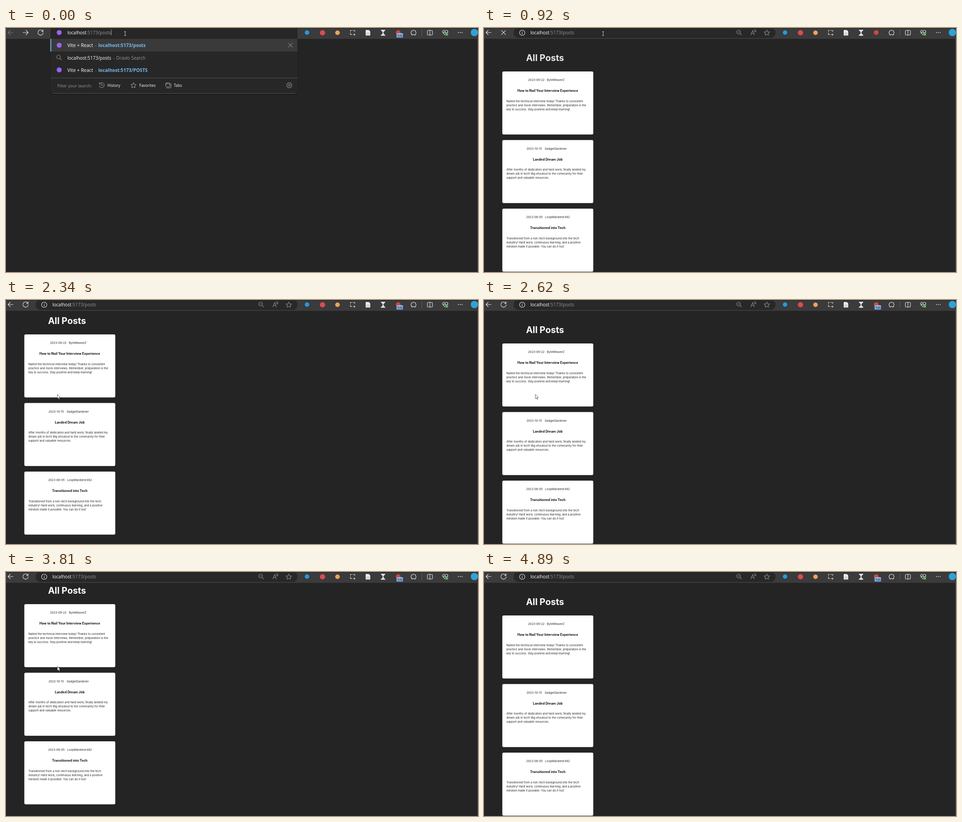
Animation, 1038 px wide and 539 px high, one loop 5.94 s. Source, as an HTML page:

```html
<!DOCTYPE html>
<html lang="en">
<head>
<meta charset="utf-8">
<title>All Posts</title>
<style>
  html, body { margin: 0; width: 100%; height: 100%; overflow: hidden; background: #242424; }
  svg { display: block; width: 1038px; height: 539px; }
  text { font-family: "Open Sans", "Noto Sans", sans-serif; font-size: 10px; fill: #fff; white-space: pre; }
  .line { fill: none; stroke: #e4e4e4; stroke-width: 1.1; stroke-linecap: round; stroke-linejoin: round; }
  .soft { stroke: #8d8d8d; }
  .dim { stroke: #777; }
  .thin { stroke: #b5b5b5; stroke-width: .9; }
  .grey { fill: #979797; }
  .name { font-size: 10.4px; }
  .url { font-weight: 700; font-size: 10.2px; fill: #76b9ed; }
  .label { font-size: 9.1px; }
  .chip { font-size: 8.5px; }
  .badge { font-size: 8px; font-weight: 600; fill: #14233c; }
  #page text { font-family: Inter, sans-serif; font-size: 6.2px; fill: #242424; font-optical-sizing: none; }
  #page .title { font-size: 19.6px; font-weight: 700; fill: #fff; }
  #page .head { font-size: 7.2px; font-weight: 700; fill: #111; }
</style>
</head>
<body>
<svg viewBox="0 0 1038 539" xmlns="http://www.w3.org/2000/svg">
  <defs>
    <g id="reload" class="line"><path d="M5.2-2.6A5.8 5.8 0 1 0 5.8.4M5.6-6V-2.4H2"/></g>
    <g id="stop" class="line"><path d="M-4.6-4.6L4.6 4.6M4.6-4.6L-4.6 4.6"/></g>
    <g id="info" class="line"><circle r="5.8"/><path d="M0-.6V3M0-2.9V-2.7"/></g>
    <g id="tools" class="line soft">
      <circle cx="560" cy="9" r="4.3"/><path d="M563.2 12.2L566.6 15.6M558 9H562"/>
      <path d="M587 15L590.8 5.2L594.6 15M588.2 12H593.3M594.3 4.8Q596 6.5 595.7 8.6M596.2 3.6Q598.4 6 597.8 9.2"/>
      <path data-star="6.4" transform="translate(622 10.8)"/>
    </g>
  </defs>
  <rect width="1038" height="539" fill="#242424"/>
  <g id="page" data-in="posts done"></g>

  <rect width="1038" height="24" fill="#3b3b3b"/>
  <path class="line dim" data-in="menu load" d="M15.6 10H4.4M9.4 5L4.4 10L9.4 15"/>
  <path class="line" data-in="blank posts done" d="M15.6 10H4.4M9.4 5L4.4 10L9.4 15"/>
  <path class="line" data-in="menu load" d="M37.2 10H48.8M43.8 5L48.8 10L43.8 15"/>
  <use href="#reload" x="76" y="10" data-in="menu"/>
  <use href="#stop" x="76" y="10" data-in="load"/>
  <use href="#stop" x="43" y="10" data-in="blank posts"/>
  <use href="#reload" x="43" y="10" data-in="done"/>

  <g data-in="load">
    <rect x="98" y="-1" width="543" height="23" rx="11.5" fill="#282828"/>
    <use href="#info" x="117" y="10.5"/><use href="#tools"/>
    <text x="135" y="14">localhost<tspan class="grey">:5173/posts</tspan></text>
  </g>
  <g data-in="blank posts done">
    <rect x="65" y="-1" width="576" height="23" rx="11.5" fill="#282828"/>
    <use href="#info" x="84" y="10.5"/><use href="#tools"/>
    <text x="102" y="14">localhost<tspan class="grey">:5173/posts</tspan></text>
  </g>

  <g data-in="menu">
    <rect x="97" y="20" width="545" height="128" rx="6" fill="#1e1e1e"/>
    <path d="M98 0H641V139Q641 145 635 145H104Q98 145 98 139Z" fill="#272727"/>
    <rect x="98" y="24" width="543" height="28" fill="#3a3a3a"/>
    <rect x="97.5" y="24" width="2" height="28" fill="#76b9ed"/>
    <path d="M98 110.5H641M102 144.5H637" stroke="#515151"/>
    <g fill="#9a62ee"><circle cx="117" cy="10" r="5.5"/><circle cx="117" cy="38" r="5.5"/><circle cx="117" cy="92.5" r="5.5"/></g>
    <text x="135" y="14">localhost<tspan class="grey">:5173/posts</tspan></text>
    <path d="M231.5 3V16" stroke="#b0b0b0" stroke-width=".8"/>
    <text x="135" y="42" class="name">Vite + React</text>
    <text x="196" y="42" class="grey">-</text>
    <text x="203" y="42" class="url">localhost:5173/posts</text>
    <path class="line thin" d="M621 33.5L630 42.5M630 33.5L621 42.5"/>
    <g class="line soft"><circle cx="115.5" cy="64" r="4"/><path d="M118.5 67L122 70.5"/></g>
    <text x="135" y="70">localhost:5173/posts</text>
    <text x="236" y="70" class="grey">-</text>
    <text x="242.5" y="70" class="grey">Dravlo Search</text>
    <text x="135" y="97" class="name">Vite + React</text>
    <text x="196" y="97" class="grey">-</text>
    <text x="203" y="97" class="url">localhost:5173/POSTS</text>
    <text x="113" y="130.5" class="grey label">Filter your search:</text>
    <text x="223" y="129.5" class="chip">History</text>
    <text x="293" y="129.5" class="chip">Favorites</text>
    <text x="369" y="129.5" class="chip">Tabs</text>
    <g class="line thin">
      <path d="M205.8 123.2A5.6 5.6 0 1 1 205 127.5M205.3 120.8V123.6H208.2M210.4 123.4V127H213"/>
      <path data-star="6.2" transform="translate(280.3 127)"/>
      <rect x="351.2" y="121" width="9.4" height="9" rx="2"/>
      <path d="M351.2 123.6H360.6M353.4 132.4H360.4Q363 132.4 363 129.8V123.4"/>
      <path id="gear" transform="translate(623 126.5)"/><circle cx="623" cy="126.5" r="1.9"/>
    </g>
  </g>

  <circle cx="662" cy="10" r="4.8" fill="#219be3"/>
  <circle cx="696" cy="10.5" r="5.8" fill="#dc4b55"/>
  <circle cx="729" cy="10.5" r="5" fill="#eda45c"/>
  <path class="line" d="M757.5 7.5V5.5H760M763 5.5H767V8M757.5 10.5V14.5H761M764 14.5H768M766 12.5V16.5"/>
  <path d="M791 4.5H798L801 7.5V16.5H791Z" fill="#eee"/>
  <path d="M792.5 11H799.5M792.5 13.5H799.5" stroke="#aaa"/>
  <path d="M825 5H833.5L829.8 10.5L833.5 16H825L828.7 10.5Z" fill="#c4deef"/>
  <path d="M824.5 4.8H834M824.5 16.2H834" stroke="#f2f2f2" stroke-width="1.4"/>
  <circle cx="862.5" cy="10" r="5.3" fill="#cf463f"/>
  <g data-in="menu load done">
    <rect x="859" y="11.5" width="14" height="9.5" rx="1.5" fill="#8fbcf5"/>
    <text x="866" y="19.6" text-anchor="middle" class="badge">1m</text>
  </g>
  <path class="line" d="M892 6H894.5A2 2 0 0 1 898.4 6H900.6V8.6A2 2 0 0 1 900.6 12.4V15.4H897.8A1.9 1.9 0 0 0 894.2 15.4H892V12.6A2.2 2.2 0 0 1 892 8.4Z"/>
  <path d="M914.5 4V17" stroke="#626262"/>
  <path class="line" d="M931 5.5H928Q926.6 5.5 926.6 7V14Q926.6 15.3 928 15.3H931M933.5 5.5H936.4Q937.8 5.5 937.8 7V14Q937.8 15.3 936.4 15.3H933.5M932.2 4V17"/>
  <path class="line" d="M966 15.6L961.4 11Q959.2 8 961.2 5.8Q963.8 3.8 966 6.6Q968.4 3.8 970.8 5.8Q972.6 8 971 10.4M960.5 10H963.5L965 7.8L967 12L968.2 10H970"/>
  <circle cx="969.5" cy="14" r="2.9" fill="#58b368"/>
  <g fill="#e4e4e4"><circle cx="995" cy="10" r="1"/><circle cx="999" cy="10" r="1"/><circle cx="1003" cy="10" r="1"/></g>
  <circle cx="1030" cy="10" r="8" fill="#2ba3dc"/>
  <path d="M0 .5H1038" stroke="#262626"/>
  <path d="M1037.5 24V539" stroke="#555"/>

  <path id="beam" d="M260 8H264M260 16.5H264M262 8V16.5" stroke="#c8c8c8"/>
  <path id="arrow" d="M0 0V9.4L2.2 7.5L3.8 11L5.3 10.3L3.8 7H6.6Z" fill="#fff" stroke="#222" stroke-width=".7"/>
</svg>
<script>
const LOOP = 5940;
const $ = id => document.getElementById(id);

// Each track holds [start time, value] and keeps the value until the next entry.
const views = [[0, 'menu'], [530, 'load'], [790, 'blank'], [920, 'posts'], [1050, 'done']];
const scroll = [
  [0, 0], [1910, -44.5], [2060, -56], [2340, -20], [2490, -5], [2620, 0],
  [2900, 17], [3160, 11.5], [3310, 3], [3430, 0],
  [3810, -25], [3940, -45], [4070, -56], [4220, -16], [4350, 0]
];
const pointer = [
  [0, null], [1480, [133.5, 200]], [1630, [113, 208.5]],
  [4350, [653, 314]], [4500, [728, 412]], [4760, [834.5, 412]], [4890, null]
];
const at = (track, t) => track.findLast(step => step[0] <= t)[1];

const ring = (n, radius) => 'M' + Array.from({ length: n }, (_, i) => {
  const a = i * 2 * Math.PI / n - Math.PI / 2, r = radius(i);
  return (r * Math.cos(a)).toFixed(2) + ' ' + (r * Math.sin(a)).toFixed(2);
}).join('L') + 'Z';

document.querySelectorAll('[data-star]').forEach(el => {
  const r = +el.dataset.star;
  el.setAttribute('d', ring(10, i => i % 2 ? r * 0.48 : r));
});
$('gear').setAttribute('d', ring(24, i => i % 3 ? 6 : 4.7));

const posts = [
  { date: '2023-09-22', dateX: 97, user: 'ByteWeaverZ', userX: 138.3, head: 'How to Nail Your Interview Experience',
    body: ['Nailed the technical interview today! Thanks to consistent',
           'practice and mock interviews. Remember, preparation is the',
           'key to success. Stay positive and keep learning!'] },
  { date: '2023-10-15', dateX: 93.5, user: 'GadgetGardener', userX: 133.4, head: 'Landed Dream Job',
    body: ['After months of dedication and hard work, finally landed my',
           'dream job in tech! Big shoutout to the community for their',
           'support and valuable resources.'] },
  { date: '2023-08-05', dateX: 92.7, user: 'LoopWanderer482', userX: 134.3, head: 'Transitioned into Tech',
    body: ['Transitioned from a non-tech background into the tech',
           'industry! Hard work, continuous learning, and a positive',
           'mindset made it possible. You can do it too!'] }
];

const text = (x, y, s, attrs = '') => `<text x="${x}" y="${y}" ${attrs}>${s}</text>`;
const card = (p, i) => `<g transform="translate(0 ${96 + i * 151.5})">
  <rect x="40.3" width="200" height="139.2" rx="3" fill="#fff"/>
  ${text(p.dateX, 21.3, p.date)}${text(p.userX, 21.3, p.user)}
  ${text(140.2, 45, p.head, 'class="head" text-anchor="middle"')}
  ${p.body.map((s, n) => text(49.2, 67.6 + n * 9.1, s)).join('')}</g>`;

const page = $('page');
page.innerHTML = text(134.2, 72.8, 'All Posts', 'class="title" text-anchor="middle"') + posts.map(card).join('');
const title = page.querySelector('.title');
const parts = [...document.querySelectorAll('[data-in]')].map(el => [el, el.dataset.in.split(' ')]);
const show = (el, on) => { el.style.display = on ? '' : 'none'; };

function draw(t) {
  const view = at(views, t), pos = at(pointer, t);
  parts.forEach(([el, list]) => show(el, list.includes(view)));
  title.style.fill = view === 'posts' ? '#e8e8e8' : '#fff';
  page.setAttribute('transform', `translate(0 ${at(scroll, t)})`);
  show($('beam'), t < 1480);
  show($('arrow'), pos);
  if (pos) $('arrow').setAttribute('transform', `translate(${pos})`);
}

const start = performance.now();
function tick() {
  draw((performance.now() - start) % LOOP);
  requestAnimationFrame(tick);
}
tick();
</script>
</body>
</html>
```
